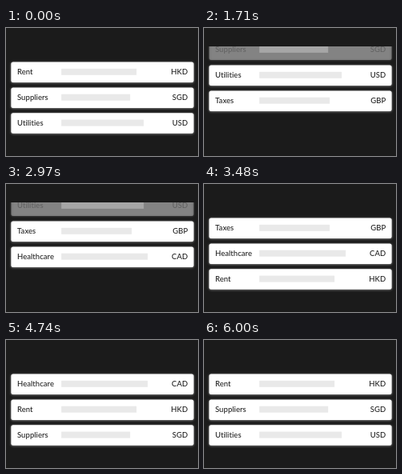
Write an HTML page with a canvas that moves like this. It is 240 px wide and 160 px high and loops after 6330 ms.

```html
<!DOCTYPE html>
<html lang="en">
<head>
<meta charset="utf-8">
<title>Payments list</title>
<style>
  html, body { margin: 0; height: 100%; overflow: hidden; background: #1b1b1b; }
  canvas { display: block; }
</style>
</head>
<body>
<canvas width="240" height="160"></canvas>
<script>
const ctx = document.querySelector('canvas').getContext('2d');
const LOOP = 6330, TICK = 30, PERIOD = 1260, FIRST = 300;
const TOP = 42.5, PITCH = 31.9, HEIGHT = 25.5;

// label, bar width, currency
const rows = [
  ['Rent', 94, 'HKD'],
  ['Suppliers', 86, 'SGD'],
  ['Utilities', 103, 'USD'],
  ['Taxes', 88, 'GBP'],
  ['Healthcare', 108, 'CAD']
];

const clamp = v => Math.min(1, Math.max(0, v));
const easeOut = v => 1 - (1 - clamp(v)) ** 3;

function drawRow(index, y, { card = 1, height = HEIGHT, glow = 1, content = 1 } = {}) {
  const [label, width, currency] = rows[index % rows.length];
  if (card <= 0 || height <= 0) return;

  ctx.globalAlpha = card;
  ctx.fillStyle = '#fff';
  ctx.shadowColor = `rgba(255,255,255,${0.55 * glow})`;
  ctx.shadowBlur = 3;
  ctx.shadowOffsetY = 0.5;
  ctx.beginPath();
  ctx.roundRect(6.4, y, 228.2, height, Math.min(2.5, height / 2));
  ctx.fill();
  ctx.shadowColor = 'transparent';

  ctx.globalAlpha = content;
  ctx.fillStyle = '#e9e9e9';
  ctx.fillRect(69.2, y + 8.3, width, 8);
  ctx.fillStyle = '#222';
  ctx.textAlign = 'left';
  ctx.fillText(label, 14, y + 15.5);
  ctx.textAlign = 'right';
  ctx.fillText(currency, 227.2, y + 15.5);
}

function draw(time) {
  const t = time % LOOP - FIRST;
  const turn = Math.floor(t / PERIOD);
  const step = Math.min(22, Math.floor((t - turn * PERIOD) / TICK));
  const first = turn + rows.length;
  const top = TOP - PITCH * easeOut(step / 10);

  ctx.globalAlpha = 1;
  ctx.fillStyle = '#1b1b1b';
  ctx.fillRect(0, 0, 240, 160);
  ctx.font = '500 9.5px Lato, sans-serif';
  ctx.letterSpacing = '0.05px'; // also turns ligatures off

  ctx.save();
  ctx.beginPath();
  ctx.rect(0, 23, 240, 137);
  ctx.clip();
  const fade = clamp(1 - step / 7.5);
  drawRow(first, top, { card: fade, content: fade });
  drawRow(first + 1, top + PITCH);
  drawRow(first + 2, top + 2 * PITCH);
  drawRow(first + 3, TOP + 2 * PITCH, {
    height: HEIGHT * easeOut((step - 6) / 8),
    glow: clamp((step - 9) / 7),
    content: clamp((step - 11) / 11)
  });
  ctx.restore();
}

const start = performance.now();
function frame() {
  draw(performance.now() - start);
  requestAnimationFrame(frame);
}
frame();
</script>
</body>
</html>
```
